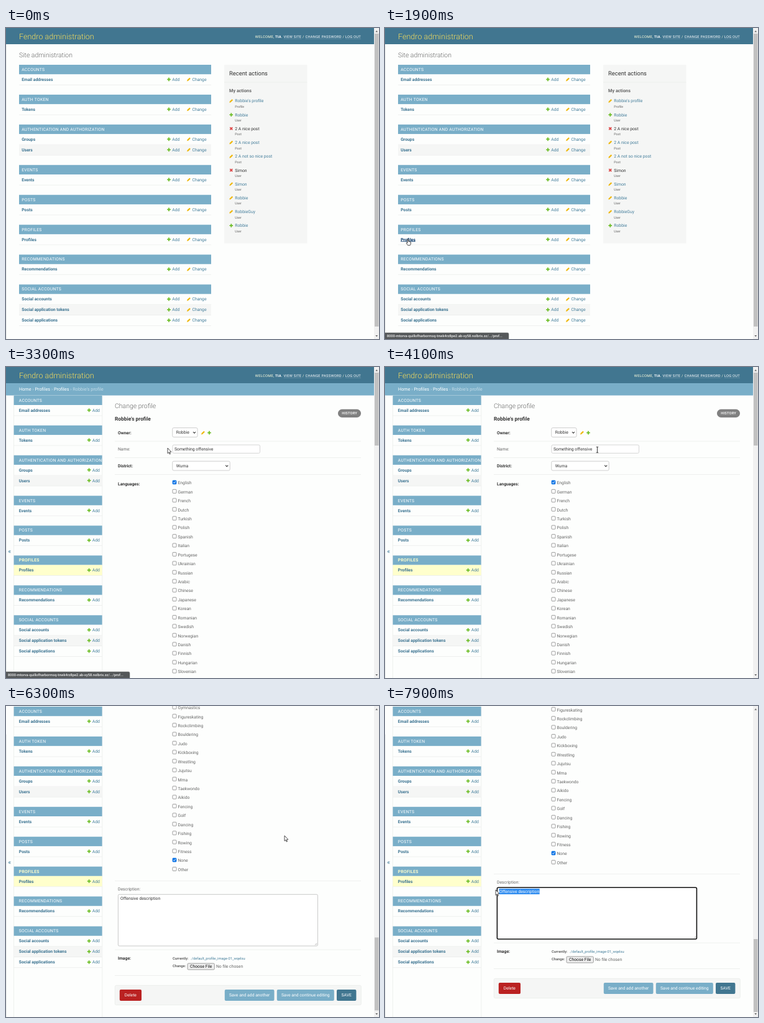
An HTML page with a canvas that plays this animation: 600x499 px, repeating every 8000 ms.

```html
<!DOCTYPE html>
<html lang="en">
<head>
<meta charset="utf-8">
<title>Site administration</title>
<style>
html, body { margin: 0; width: 100%; height: 100%; overflow: hidden; background: #fdfefd; }
canvas { display: block; width: 600px; height: 499px; }
</style>
</head>
<body>
<canvas id="stage"></canvas>
<script>
const W = 600, H = 499, LOOP = 8000;
const canvas = document.getElementById('stage');
const c = canvas.getContext('2d');
const dpr = window.devicePixelRatio || 1;
canvas.width = W * dpr;
canvas.height = H * dpr;

const BG = '#fdfefd', DARK = '#417690', BLUE = '#79aec8', LINK = '#447e9b', BOLD = '#3a7290';
const GREY = '#666', INK = '#333', LINE = '#e9ebe9', PALE = '#f5f6f5', CREAM = '#ffffcc';
const USER = 'Robbie', STAFF = 'Tia', OTHER = 'Simon', SITE = 'Fendro administration';
const STATUS = '8000-mtorva-quillofharbormsq-tnwk4rz8pe2.ab-xy58.nolbrix.zz/.../prof...';

const GROUPS = [
  ['Accounts', 'Email addresses'],
  ['Auth token', 'Tokens'],
  ['Authentication and authorization', 'Groups', 'Users'],
  ['Events', 'Events'],
  ['Posts', 'Posts'],
  ['Profiles', 'Profiles'],
  ['Recommendations', 'Recommendations'],
  ['Social accounts', 'Social accounts', 'Social application tokens', 'Social applications']
];
const ACTIONS = [
  ['edit', USER + "'s profile", 'Profile'], ['add', USER, 'User'],
  ['del', '2 A nice post', 'Post'], ['edit', '2 A nice post', 'Post'],
  ['edit', '2 A not so nice post', 'Post'], ['del', OTHER, 'User'],
  ['edit', OTHER, 'User'], ['edit', USER, 'User'],
  ['edit', USER + 'Guy', 'User'], ['add', USER, 'User']
];
const LANGUAGES = ('English German French Dutch Turkish Polish Spanish Italian Portugese Ukrainian Russian ' +
  'Arabic Chinese Japanese Korean Romanian Swedish Norwegian Danish Finnish Hungarian Slovenian ' +
  'Croatian Serbian Greek Czech Slovak Bulgarian Albanian Hindi Persian Hebrew Vietnamese Other').split(' ');
const INTERESTS = ('Music Movies Reading Writing Cooking Baking Painting Drawing Photography Theatre Opera Museums ' +
  'History Politics Science Technology Gaming Chess Boardgames Puzzles Gardening Travel Hiking Camping ' +
  'Cycling Running Swimming Sailing Surfing Diving Skiing Snowboarding Skating Football Basketball ' +
  'Volleyball Handball Tennis Badminton Squash Hockey Rugby Baseball Cricket Yoga Pilates Meditation ' +
  'Knitting Sewing Pottery Carpentry Astronomy Birdwatching Horseriding Archery Bowling Darts Athletics Weightlifting ' +
  'Gymnastics Figureskating Rockclimbing Bouldering Judo Kickboxing Wrestling Jujutsu Mma Taekwondo ' +
  'Aikido Fencing Golf Dancing Fishing Rowing Fitness None Other').split(' ');

const STEP = 14.43, LANG_Y = 185.5;
const LANG_END = LANG_Y + STEP * (LANGUAGES.length - 1);
const INT_Y = LANG_END + 31.5;
const MAX_SCROLL = INT_Y + STEP * (INTERESTS.length - 1) - 251;

// time, x, y of the pointer tip
const PATH = [
  [1000, 300, 470], [1700, 37, 339], [2000, 37, 339], [2400, 248, 161], [2700, 222, 127],
  [3000, 222, 127], [3300, 260, 130], [3900, 342, 133], [4500, 340, 132], [4600, 334, 132],
  [4900, 268, 132], [5000, 270, 134], [5400, 487, 360], [5500, 485, 345], [5900, 450, 176],
  [6000, 450, 176], [6300, 448, 208], [6600, 440, 225], [7200, 249, 298], [7400, 249, 298],
  [7800, 178, 295], [8000, 178, 295]
];

const clamp = v => Math.max(0, Math.min(1, v));
const ease = v => { v = clamp(v); return v * v * (3 - 2 * v); };
const span = (t, a, b) => ease((t - a) / (b - a));

function text(s, x, y, size = 6.8, color = GREY, weight = 400, gap = 0, align = 'left') {
  c.font = `${weight} ${size}px Roboto, Arial, sans-serif`;
  c.letterSpacing = gap + 'px';
  c.textAlign = align;
  c.fillStyle = color;
  c.fillText(s, x, y + size * 0.355);
  return c.measureText(s).width;
}

function rect(x, y, w, h, color) {
  c.fillStyle = color;
  c.fillRect(x, y, w, h);
}

function box(x, y, w, h, r, fill, stroke, lw = 0.7) {
  c.beginPath();
  c.roundRect(x, y, w, h, r);
  if (fill) { c.fillStyle = fill; c.fill(); }
  if (stroke) { c.strokeStyle = stroke; c.lineWidth = lw; c.stroke(); }
}

function poly(pts, stroke, lw, fill) {
  c.beginPath();
  pts.forEach(([x, y], i) => i ? c.lineTo(x, y) : c.moveTo(x, y));
  if (fill) { c.closePath(); c.fillStyle = fill; c.fill(); }
  if (stroke) { c.strokeStyle = stroke; c.lineWidth = lw; c.stroke(); }
}

const rule = (x, y, w) => rect(x, y - 0.3, w, 0.7, LINE);

function icon(kind, x, y) {
  if (kind === 'add') {
    rect(x - 2.8, y - 0.9, 5.6, 1.8, '#70bf2b');
    rect(x - 0.9, y - 2.8, 1.8, 5.6, '#70bf2b');
  } else if (kind === 'edit') {
    poly([[x - 2.9, y + 2.9], [x - 2.3, y + 0.6], [x + 1.3, y - 2.8], [x + 2.9, y - 1.3], [x - 0.8, y + 2.3]], null, 0, '#efb80b');
  } else {
    poly([[x - 2, y - 2], [x + 2, y + 2]], '#dd4646', 1.7);
    poly([[x + 2, y - 2], [x - 2, y + 2]], '#dd4646', 1.7);
  }
}

function check(x, y, on) {
  box(x + 0.4, y - 3, 6, 6, 1, on ? '#0b74e5' : '#fff', on ? '#0b74e5' : '#777', 0.7);
  if (on) poly([[x + 1.6, y], [x + 2.9, y + 1.4], [x + 5.3, y - 1.6]], '#fff', 1);
}

function select(x, y, w, h, label) {
  box(x, y, w, h, 2, '#fff', '#bbb');
  text(label, x + 6, y + h / 2, 6.8, INK);
  const a = x + w - 5, m = y + h / 2;
  poly([[a - 2, m - 1], [a, m + 1.2], [a + 2, m - 1]], INK, 1.1);
}

function pill(x, y, w, h, color, label, size = 6.8, weight = 400) {
  box(x, y, w, h, 2, color);
  text(label, x + w / 2, y + h / 2, size, '#fff', weight, 0, 'center');
}

function header(width, right, crumbs) {
  rect(0, 0, width, 26, DARK);
  text(SITE, 21, 13.5, 12.55, '#f5dd5d', 300);
  const parts = [['WELCOME, ', 400], [STAFF.toUpperCase(), 700], ['. ', 400], ['VIEW SITE', 400, 1], [' / ', 400],
    ['CHANGE PASSWORD', 400, 1], [' / ', 400], ['LOG OUT', 400, 1]];
  const gap = 0.26, size = 5.75;
  c.letterSpacing = gap + 'px';
  const widths = parts.map(([s, w]) => {
    c.font = `${w} ${size}px Roboto, Arial, sans-serif`;
    return c.measureText(s).width;
  });
  let x = right - widths.reduce((a, b) => a + b, 0);
  parts.forEach(([s, w, link], i) => {
    text(s, x, 13.5, size, link || w > 400 ? '#fff' : '#ffffdd', w, gap);
    if (link) rect(x, 17, widths[i], 0.5, 'rgba(255,255,255,.3)');
    x += widths[i];
  });
  if (!crumbs) return;
  rect(0, 26, width, 19.6, BLUE);
  x = 21;
  crumbs.forEach((s, i) => {
    const last = i === crumbs.length - 1;
    x += text(s, x, 35.6, 7.3, last ? '#c4dce8' : '#fff');
    if (!last) x += text(' › ', x, 35.6, 7.3, '#c4dce8');
  });
}

// module list shared by the dashboard and the sidebar
function modules(x, y, w, pad, side, hover) {
  GROUPS.forEach(([name, ...rows]) => {
    const current = side && name === 'Profiles';
    rect(x, y, w, 15.2, BLUE);
    text(name.toUpperCase(), x + pad, y + 7.5, 6.8, current ? CREAM : '#fff', current ? 700 : 400, 0.26);
    rows.forEach((row, i) => {
      const top = y + 15.2 + 17 * i, mid = y + 23.5 + 17 * i;
      if (current) rect(x, top, w, 16.8, CREAM);
      else if (i % 2) rect(x, top, w, 17, PALE);
      rule(x, top + 17, w);
      const hot = hover && name === 'Profiles';
      const len = text(row, x + pad, mid, 6.8, hot ? '#003366' : BOLD, 700);
      if (hot) rect(x + pad, mid + 3.2, len, 0.7, '#003366');
      const ax = side ? x + 121 : x + 241;
      icon('add', ax, mid);
      text('Add', ax + 5.2, mid, 6.8, LINK);
      if (!side) {
        icon('edit', x + 273, mid);
        text('Change', x + 278.5, mid, 6.8, LINK);
      }
    });
    y += 47.93 + 17 * (rows.length - 1);
  });
}

function sidebar(mid) {
  rect(12, 45.6, 0.7, H + 10, LINE);
  rect(154.5, 45.6, 0.7, H + 10, LINE);
  text('«', 5.8, mid, 10.5, LINK, 400, 0, 'center');
  modules(12.6, 45.8, 142, 8.2, true, false);
}

function scrollbar(top, len) {
  rect(592, 0, 8, H, '#f1f1f1');
  rect(593, top, 6.5, len, '#c1c1c1');
  poly([[594.3, 6.5], [596.2, 4], [598.1, 6.5]], null, 0, '#666');
  poly([[594.3, 493], [596.2, 495.5], [598.1, 493]], null, 0, '#666');
}

function status() {
  box(-2, 489, 201, 12, 2, '#55585a', '#77797b', 0.6);
  text(STATUS, 3, 494, 5.7, '#eee', 500);
}

function dashboard(hover) {
  header(592, 571, null);
  text('Site administration', 21, 43, 10.46, GREY, 300);
  modules(21, 59, 309, 4.2, false, hover);
  rect(351, 59, 133.5, 286.5, PALE);
  text('Recent actions', 359, 73, 9.4, INK);
  rule(351, 87, 133.5);
  text('My actions', 359, 100, 7.3, GREY, 700);
  ACTIONS.forEach(([kind, name, type], i) => {
    const y = 117 + 22.22 * i;
    icon(kind, 362.3, y);
    text(name, 368.3, y, 6.8, kind === 'del' ? INK : LINK);
    text(type, 368.3, y + 9, 5.2, GREY);
  });
  scrollbar(9, 470);
}

function listPage(hover) {
  header(600, 580, ['Home', 'Profiles', 'Profiles']);
  sidebar(273);
  text('Select profile to change', 175, 62, 10.46, GREY, 300);
  box(523.3, 54, 56.7, 13.3, 6.6, '#808080');
  text('ADD PROFILE', 529.5, 60.7, 5.75, '#fff', 500, 0.2);
  rect(570.6, 60, 5, 1.3, '#fff');
  rect(572.4, 58.2, 1.3, 5, '#fff');
  text('Action:', 180, 89.3);
  select(208.3, 83.5, 89, 11.8, '---------');
  box(299.8, 83.5, 16.5, 11.8, 2, '#f4f4f4', '#bbb');
  text('Go', 308, 89.5, 6.8, INK, 400, 0, 'center');
  text('0 of 3 selected', 322, 89.3);
  rect(175, 101, 405, 16.5, PALE);
  rule(175, 101, 405);
  rule(175, 117.7, 405);
  check(180, 109, false);
  text('PROFILE', 197, 109.7, 5.75, GREY, 700);
  rect(175, 135, 405, 17.3, PALE);
  [USER, STAFF, 'Admin'].forEach((name, i) => {
    const y = 126.3 + 17.4 * i, hot = hover && i === 0;
    check(180, y - 0.5, false);
    const len = text(name + "'s profile", 196.3, y, 6.8, hot ? '#003366' : BOLD, 700);
    if (hot) rect(196.3, y + 3.2, len, 0.7, '#003366');
    rule(175, y + 8.8, 405);
  });
  text('3 profiles', 180, 182);
  rule(175, 193, 415);
}

function choices(list, y0, scroll, picked) {
  list.forEach((name, i) => {
    const y = y0 + STEP * i;
    if (y - scroll < -10 || y - scroll > H + 10) return;
    check(267.6, y - 0.5, name === picked);
    text(name, 276.5, y + 0.4);
  });
}

// selected text runs from the given left edge to the end of the line
function selectable(s, x, y, from) {
  const len = text(s, x, y, 6.8, INK);
  if (from == null) return;
  const left = Math.max(from, x - 0.5), w = x + len + 0.5 - left;
  if (w <= 0) return;
  rect(left, y - 4.6, w, 9, '#2f8cf0');
  c.save();
  c.beginPath();
  c.rect(left, y - 5, w, 10);
  c.clip();
  text(s, x, y, 6.8, '#fff');
  c.restore();
}

function formPage(t, scroll, px) {
  c.save();
  c.translate(0, -scroll);
  header(592, 571, ['Home', 'Profiles', 'Profiles', USER + "'s profile"]);
  text('Change profile', 175, 62, 10.46, GREY, 300);
  text(USER + "'s profile", 175, 83, 8.37, INK, 700);
  box(534, 67.7, 37, 13.3, 6.6, '#808080');
  text('HISTORY', 552.6, 74.3, 5.75, '#fff', 500, 0.2, 'center');
  text('Owner:', 180, 105.3, 6.8, INK, 700);
  select(267.8, 97.6, 40.2, 14.8, USER);
  icon('edit', 317, 105.5);
  icon('add', 327, 105.5);
  rule(175, 119, 396);
  text('Name:', 180, 132);
  const focus = t >= 4300 && t < 6300;
  box(268, 125, 140.5, 13.3, 2, '#fff', focus ? '#101010' : '#ccc', focus ? 1.6 : 0.8);
  if (t < 5000) selectable('Something offensive', 271, 131.5, t >= 4600 ? px : null);
  else if (Math.floor(t / 500) % 2 === 0) rect(271.3, 127.5, 0.7, 8, INK);
  rule(175, 145.5, 396);
  text('District:', 180, 158.5, 6.8, INK, 700);
  select(267.8, 151.2, 92.4, 14.8, 'Wurna');
  rule(175, 172.5, 396);
  text('Languages:', 180, 187.7, 6.8, INK, 700);
  choices(LANGUAGES, LANG_Y, scroll, 'English');
  rule(175, LANG_END + 18.5, 396);
  text('Interests:', 180, INT_Y + 2, 6.8, INK, 700);
  choices(INTERESTS, INT_Y, scroll, 'None');

  c.translate(0, MAX_SCROLL);
  rule(175, 269.7, 396);
  text('Description:', 180, 283);
  const area = t >= 7300;
  box(180.4, 291.3, 321, 82.7, 2, '#fff', area ? '#101010' : '#bbb', area ? 1.6 : 0.8);
  poly([[497, 372.5], [500, 369.5]], '#888', 0.6);
  poly([[498.8, 372.5], [500, 371.3]], '#888', 0.6);
  selectable('Offensive description', 184, 297.7, t >= 7500 ? px : null);
  rule(175, 380, 396);
  text('Image:', 180, 394, 6.8, INK, 700);
  text('Currently:', 268, 394, 5.75, GREY, 700);
  text('./default_profile_image-01_wqelsu', 297, 394, 5.75, LINK);
  text('Change:', 268, 406, 5.75, GREY, 700);
  box(292, 402, 43.3, 10, 1.5, '#efefef', '#777');
  text('Choose File', 313.7, 407, 6.8, '#111', 400, 0, 'center');
  text('No file chosen', 338, 407);
  rule(175, 421.5, 396);
  box(175.3, 437.3, 396, 31.4, 2, PALE, LINE);
  pill(182.8, 444, 35.2, 18, '#ba2121', 'Delete');
  pill(351.8, 444, 79.7, 18, BLUE, 'Save and add another');
  pill(435.8, 444, 92, 18, BLUE, 'Save and continue editing');
  pill(532, 444, 31.4, 18, DARK, 'SAVE');
  c.restore();

  c.save();
  c.translate(0, -Math.min(scroll, 44.8));
  sidebar(295);
  c.restore();
  scrollbar(9 + 365 * scroll / MAX_SCROLL, 117);
}

function pointerAt(t) {
  let i = 0;
  while (i < PATH.length - 2 && PATH[i + 1][0] <= t) i++;
  const [t0, x0, y0] = PATH[i], [t1, x1, y1] = PATH[i + 1], k = span(t, t0, t1);
  return [x0 + (x1 - x0) * k, y0 + (y1 - y0) * k];
}

function pointer(x, y, t) {
  const hand = (t >= 1700 && t < 2100) || (t >= 2700 && t < 3100);
  const beam = (t >= 3500 && t < 5100) || (t >= 7000 && t < 7800);
  c.save();
  c.translate(x, y);
  if (hand) {
    poly([[-0.8, 0], [0.6, 0], [0.8, 3.3], [4, 4.2], [4.6, 5], [4.2, 8], [3.4, 9.6], [-0.4, 9.6], [-2.6, 6.2],
      [-2.2, 5.2], [-0.8, 6], [-0.8, 0]], '#222', 0.8, '#fff');
  } else if (beam) {
    poly([[-1.8, -4.5], [1.8, -4.5]], '#222', 0.8);
    poly([[0, -4.5], [0, 4.5]], '#222', 0.9);
    poly([[-1.8, 4.5], [1.8, 4.5]], '#222', 0.8);
  } else {
    poly([[0, 0], [0, 8.6], [1.9, 6.9], [3.2, 9.9], [4.5, 9.3], [3.2, 6.4], [5.8, 6.2], [0, 0]], '#222', 0.8, '#fff');
  }
  c.restore();
}

function draw(now) {
  // the screen refreshes ten times a second
  const t = Math.floor((now % LOOP) / 100) * 100;
  const [x, y] = pointerAt(t);
  c.setTransform(dpr, 0, 0, dpr, 0, 0);
  c.textRendering = 'geometricPrecision';
  rect(0, 0, W, H, BG);
  if (t < 2000) dashboard(t >= 1700);
  else if (t < 3000) listPage(t >= 2700);
  else {
    const far = MAX_SCROLL - 11;
    formPage(t, far * span(t, 6000, 6300) + 11 * span(t, 6300, 6500), x);
  }
  rect(0, t < 2000 ? 26 : 45.6, 0.7, H, '#dfe3e1');
  if ((t >= 1800 && t < 2100) || (t >= 2700 && t < 3700)) status();
  if (t >= 1000) pointer(x, y, t);
}

const start = performance.now();
function tick() {
  draw(performance.now() - start);
  requestAnimationFrame(tick);
}
tick();
</script>
</body>
</html>
```
